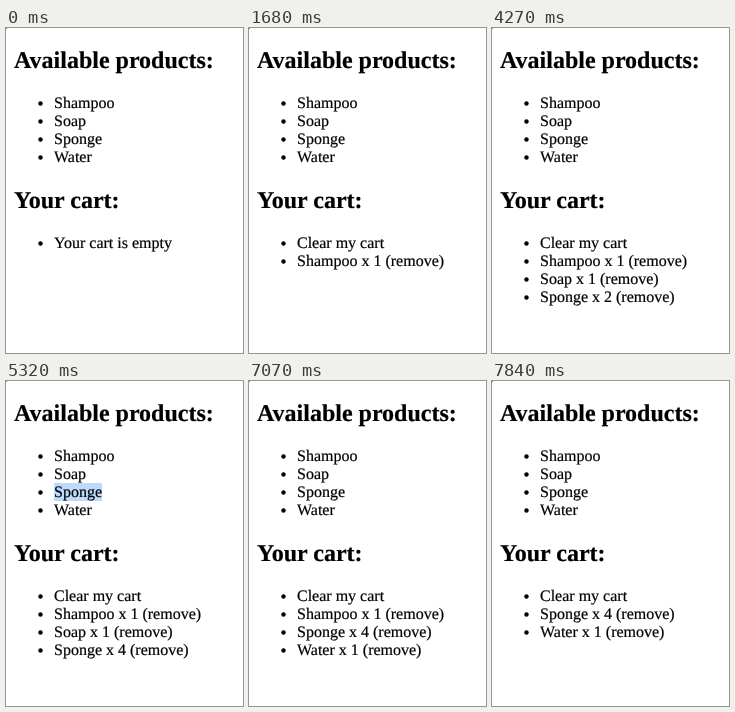
These frames come from a looping animation (237 px wide and 325 px high, 8 s). An HTML page:

```html
<!DOCTYPE html>
<html lang="en">
<head>
<meta charset="utf-8">
<title>Shopping cart</title>
<style>
  html, body { margin: 0; width: 100%; height: 100%; overflow: hidden; background: #fff; }
  svg { display: block; font: 16px "Liberation Serif", Times, serif; }
  text { stroke: #000; stroke-width: .2px; text-rendering: geometricPrecision; }
  .title { font-size: 24px; font-weight: bold; }
</style>
</head>
<body>
<svg width="237" height="325" viewBox="0 0 237 325">
  <rect width="1" height="1" fill="#777"/>
  <rect id="selection" x="48" y="102" width="48" height="18" fill="#bddafc"/>
  <text class="title" x="8" y="40">Available products:</text>
  <g id="products"></g>
  <text class="title" x="8" y="180">Your cart:</text>
  <g id="cart"></g>
</svg>
<script>
const LOOP = 8000;
const $ = id => document.getElementById(id);

// [time, product, quantity]; zero removes the product
const changes = [
  [1610, 'Shampoo', 1],
  [2240, 'Soap', 1],
  [3010, 'Sponge', 1],
  [4200, 'Sponge', 2],
  [4690, 'Sponge', 3],
  [5110, 'Sponge', 4],
  [5880, 'Water', 1],
  [7070, 'Soap', 0],
  [7840, 'Shampoo', 0]
];

function list(id, items, baseline) {
  $(id).innerHTML = items.map((item, i) => {
    const y = baseline + 18 * i;
    return `<circle cx="34.5" cy="${y - 4.5}" r="2.2"/><text x="48" y="${y}">${item}</text>`;
  }).join('');
}

function cartLines(t) {
  const cart = new Map();
  for (const [time, name, count] of changes) {
    if (t < time) break;
    if (count) cart.set(name, count);
    else cart.delete(name);
  }
  if (!cart.size) return ['Your cart is empty'];
  return ['Clear my cart', ...[...cart].map(([name, n]) => `${name} x ${n} (remove)`)];
}

let shown = '';
function draw(now) {
  const t = now % LOOP;
  const lines = cartLines(t);
  if (lines.join() !== shown) {
    shown = lines.join();
    list('cart', lines, 220);
  }
  $('selection').style.display = t >= 4620 && t < 5740 ? '' : 'none';
}

list('products', ['Shampoo', 'Soap', 'Sponge', 'Water'], 80);
const start = performance.now();
function frame() {
  draw(performance.now() - start);
  requestAnimationFrame(frame);
}
frame();
</script>
</body>
</html>
```
